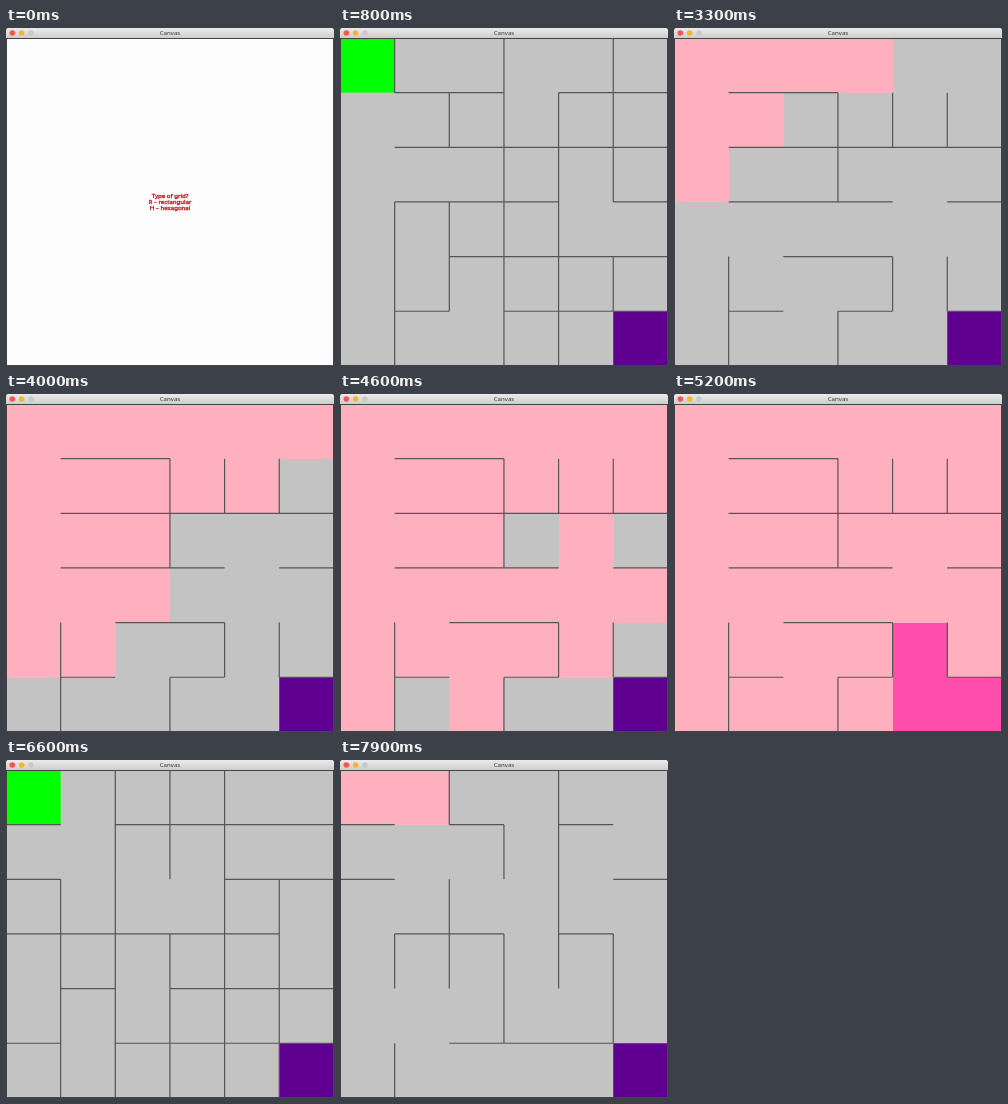
Write an HTML page with a canvas that moves like this. It is 328x338 px and loops after 8000 ms.

```html
<!DOCTYPE html>
<html lang="en">
<head>
<meta charset="utf-8">
<title>Canvas</title>
<style>
  html, body { margin: 0; width: 100%; height: 100%; overflow: hidden; background: #fff; }
  canvas { display: block; width: 328px; height: 338px; }
</style>
</head>
<body>
<canvas id="stage" width="328" height="338"></canvas>
<script>
const ctx = document.getElementById('stage').getContext('2d');
const W = 328, H = 338, TOP = 10, N = 6, CELL = 54.65;
const LOOP = 8000, TICK = 100;
const COLORS = {
  floor: '#c3c3c3', start: '#00ff00', goal: '#5f0090',
  seen: '#ffb0bf', path: '#ff4dac', wall: '#555', text: '#cf0a0a'
};
const PROMPTS = {
  grid: ['Type of grid?', 'R – rectangular', 'H – hexagonal'],
  solve: ['Solve the maze?', 'A – automatic', 'M – manual', 'R – restart'],
  search: ['Type of search?', 'B – breadth-first', 'D – depth-first']
};

function seeded(seed) {
  return () => (seed = (seed * 16807) % 2147483647) / 2147483647;
}

// rows: columns walled along each inner horizontal line; cols: rows walled along each vertical one
function makeMaze(rows, cols, seed) {
  const random = seeded(seed);
  const edges = [];
  for (let line = 1; line < N; line++) {
    for (let i = 0; i < N; i++) {
      edges.push({ flat: true, r: line, c: i, solid: rows[line - 1].includes(i) });
      edges.push({ flat: false, r: i, c: line, solid: cols[line - 1].includes(i) });
    }
  }
  for (const e of edges) e.rank = random() + (e.r + e.c) * 0.05;
  const open = edges.filter(e => !e.solid).sort((a, b) => a.rank - b.rank);
  return { walls: edges.filter(e => e.solid), open, ...solve(open) };
}

// Breadth-first search from the top left cell to the bottom right one
function solve(open) {
  const links = Array.from({ length: N * N }, () => []);
  for (const e of open) {
    const b = e.r * N + e.c, a = b - (e.flat ? N : 1);
    links[a].push(b);
    links[b].push(a);
  }
  const rank = d => [-1, 1, -N, N].indexOf(d);
  const parent = { 0: -1 }, visited = [0];
  for (const cell of visited) {
    links[cell].sort((a, b) => rank(a - cell) - rank(b - cell));
    for (const next of links[cell]) {
      if (next in parent) continue;
      parent[next] = cell;
      visited.push(next);
    }
  }
  const path = [];
  for (let cell = N * N - 1; cell >= 0; cell = parent[cell]) path.push(cell);
  return { visited, path };
}

const first = makeMaze(['12', '12345', '1235', '23', '135'], ['45', '', '125', '14', '14'], 4211);
const second = makeMaze(['024', '05', '124', '', '234'], ['35', '023', '134', '0123', '34'], 9173);

const SCENES = [
  { from: 0, prompt: 'grid' },
  { from: 200, maze: first, carve: 400, carveTime: 1400, search: 2900, trace: 5050,
    prompts: [[2000, 'solve'], [2300, 'search'], [2700, null]] },
  { from: 5800, prompt: 'grid' },
  { from: 6000, maze: second, carve: 6400, carveTime: 900, search: 7830, trace: 9990,
    prompts: [[7400, 'solve'], [7600, 'search'], [7700, null]] }
];

function fillCell(cell, color) {
  ctx.fillStyle = color;
  ctx.fillRect((cell % N) * CELL, TOP + Math.floor(cell / N) * CELL, CELL, CELL);
}

function drawWall({ flat, r, c }) {
  const x = c * CELL, y = TOP + r * CELL;
  ctx.moveTo(x, y);
  ctx.lineTo(x + (flat ? CELL : 0), y + (flat ? 0 : CELL));
}

function stepsSince(t, start, pace) {
  return t < start ? 0 : 1 + Math.floor((t - start) / pace);
}

function drawMaze(scene, t) {
  const { maze, carve, carveTime, search, trace } = scene;
  ctx.fillStyle = COLORS.floor;
  ctx.fillRect(0, TOP, W, H - TOP);
  fillCell(0, COLORS.start);
  fillCell(N * N - 1, COLORS.goal);
  // fillRect edges are fractional, so whole runs of a colour get a hairline overlap
  const paint = (cells, color) => {
    ctx.fillStyle = color;
    ctx.beginPath();
    for (const cell of cells) {
      const x = Math.round((cell % N) * CELL), y = Math.round(TOP + Math.floor(cell / N) * CELL);
      ctx.rect(x, y, 55, 55);
    }
    ctx.fill();
  };
  paint(maze.visited.slice(0, stepsSince(t, search, 60)), COLORS.seen);
  paint(maze.path.slice(0, stepsSince(t, trace, 55)), COLORS.path);

  const u = Math.min(1, Math.max(0, (t - carve) / carveTime));
  const carved = Math.floor(maze.open.length * (1 - (1 - u) ** 2));
  ctx.beginPath();
  [...maze.walls, ...maze.open.slice(carved)].forEach(drawWall);
  ctx.strokeStyle = COLORS.wall;
  ctx.lineWidth = 1.2;
  ctx.stroke();
}

function drawPrompt(name) {
  ctx.font = '6.1px "Noto Sans", "Open Sans", sans-serif';
  ctx.textAlign = 'center';
  ctx.fillStyle = ctx.strokeStyle = COLORS.text;
  ctx.lineWidth = 0.3;
  PROMPTS[name].forEach((line, i) => {
    ctx.fillText(line, 164, 170.2 + i * 6);
    ctx.strokeText(line, 164, 170.2 + i * 6);
  });
}

function drawWindow() {
  ctx.strokeStyle = '#444';
  ctx.lineWidth = 1;
  ctx.strokeRect(0.5, 10.5, W - 1, H - 11);

  ctx.fillStyle = '#222';
  ctx.fillRect(0, 0, W, 4);
  const bar = ctx.createLinearGradient(0, 0, 0, TOP);
  bar.addColorStop(0, '#ebebeb');
  bar.addColorStop(1, '#cdcdcd');
  ctx.fillStyle = bar;
  ctx.beginPath();
  ctx.roundRect(0, 0, W, TOP, [2, 2, 0, 0]);
  ctx.fill();

  ['#fb544d', '#fdb428', '#c9c9c9'].forEach((color, i) => {
    ctx.fillStyle = color;
    ctx.beginPath();
    ctx.arc(6.3 + i * 9.3, 5, 2.8, 0, Math.PI * 2);
    ctx.fill();
  });
  ctx.font = '6.1px "Noto Sans", "Open Sans", sans-serif';
  ctx.textAlign = 'center';
  ctx.fillStyle = '#333';
  ctx.fillText('Canvas', 164, 7.3);
}

function render(now) {
  const t = Math.floor((now % LOOP) / TICK) * TICK;
  const scene = SCENES.findLast(s => t >= s.from);
  ctx.fillStyle = '#fdfdfd';
  ctx.fillRect(0, 0, W, H);
  if (scene.maze) drawMaze(scene, t);
  drawWindow();
  const prompt = scene.prompt || scene.prompts.findLast(([at]) => t >= at)?.[1];
  if (prompt) drawPrompt(prompt);
}

const began = performance.now();
function loop() {
  render(performance.now() - began);
  requestAnimationFrame(loop);
}
loop();
</script>
</body>
</html>
```
